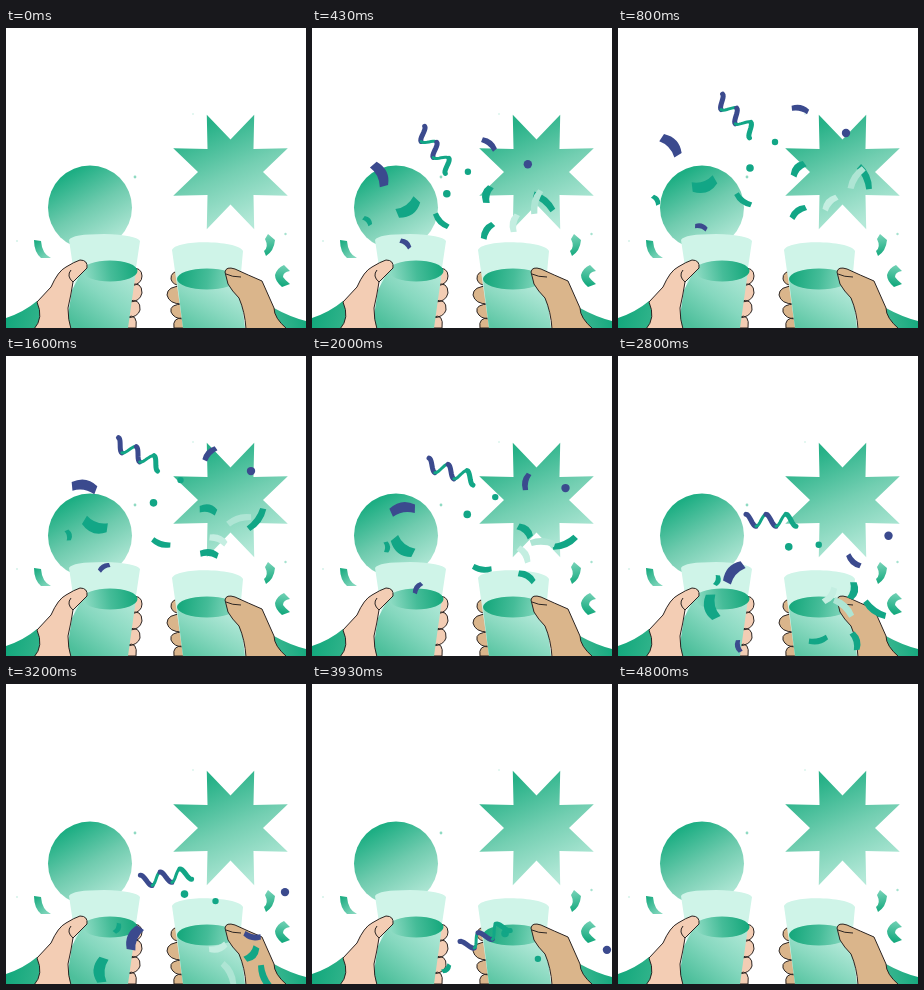
Animation of 300x300 px, one loop 6430 ms. Source, as an HTML page with a canvas:

```html
<!DOCTYPE html>
<html lang="en">
<head>
<meta charset="utf-8">
<title>Cheers</title>
<style>
html, body { margin: 0; width: 100%; height: 100%; overflow: hidden; background: #fff; }
canvas { display: block; width: 100vw; height: 100vh; }
</style>
</head>
<body>
<canvas id="stage" width="300" height="300"></canvas>
<script>
const LOOP = 6430, START = 200, SETTLE = 800, END = 4800;
const ORIGIN = [150, 305];
const TEAL = '#12a87c', MINT = '#cff4e8', GREEN = '#12a686', NAVY = '#3b4a8e', INK = '#2b2422';
const canvas = document.getElementById('stage');
const scene = document.createElement('canvas');
scene.width = scene.height = 300;
let g = scene.getContext('2d');

function blend(x0, y0, x1, y1, ...colors) {
  const grad = g.createLinearGradient(x0, y0, x1, y1);
  colors.forEach((c, i) => grad.addColorStop(i / (colors.length - 1), c));
  return grad;
}

function shape(d, fill, line) {
  const path = new Path2D(d);
  if (fill) { g.fillStyle = fill; g.fill(path); }
  if (line) { g.strokeStyle = line; g.lineWidth = 1; g.lineJoin = 'round'; g.stroke(path); }
}

function oval(x, y, rx, ry, fill) {
  g.beginPath();
  g.ellipse(x, y, rx, ry, 0, 0, Math.PI * 2);
  g.fillStyle = fill;
  g.fill();
}

function star(x, y, outer, inner, fill) {
  g.beginPath();
  for (let i = 0; i < 16; i++) {
    const a = i * Math.PI / 8, r = i % 2 ? outer : inner;
    g.lineTo(x + r * Math.cos(a), y + r * Math.sin(a));
  }
  g.fillStyle = fill;
  g.fill();
}

function drawScene() {
  oval(84, 179.5, 42, 42, blend(64, 145, 104, 214, '#1dae83', '#6fcbae', '#aee6d4'));
  star(224.5, 144, 62, 32.5, blend(198, 98, 242, 196, '#26b187', '#74cfb2', '#b4e9d8'));

  // loose pieces lying still
  shape('M28 212 L35 213 Q36 226 45 230 L35 230 Q28 224 28 212Z', blend(28, 212, 44, 231, TEAL, '#8fdcc4'));
  shape('M262 206 L269 212 Q268 223 260 228 L258 223 Q263 219 259 211Z', blend(260, 206, 264, 228, '#7bd5ba', TEAL));
  shape('M278 237 L284 243 Q277 244 277 249 Q279 252 284 256 L276 259 Q269 253 269 247 Q271 240 278 237Z', blend(280, 238, 276, 258, '#6fd0b3', TEAL));
  oval(129, 149, 1.4, 1.4, '#8fdac2');
  oval(279.5, 206, 1.2, 1.2, '#a5e2cf');
  oval(11, 213, .8, .8, '#b5e8d8');
  oval(187, 86, .7, .7, '#b5e8d8');

  // left glass
  const skinL = '#f3cdb4';
  shape('M124 240 Q136 239 136 248 Q136 256 125 258Z M124 257 Q136 253 136 265 Q134 274 123 274Z M122 273 Q135 270 134 282 Q132 289 121 290Z M121 289 Q132 285 130 300 L120 300Z', skinL, INK);
  shape('M63 212 Q66 206 98 206 Q130 207 134 213 L121 300 L62 300 L69 252Z', MINT);
  shape('M76 243 Q104 262 130 243 L122 300 L60 300 L66 262Z', blend(76, 300, 122, 240, '#4dbf9b', '#86d8bf', '#b2e9d8'));
  oval(104, 243, 27.5, 10.5, blend(78, 248, 131, 238, '#8fdcc4', '#45bc98', '#14a77b'));

  // left hand
  shape('M0 290 Q18 284 31 273 L40 300 L0 300Z', blend(0, 290, 38, 300, '#12a87c', '#36b58d'));
  shape('M31 274 L45 259 Q52 243 60 239 Q68 234 74 232 Q82 232 81 240 Q74 247 67 254 Q65 267 62 280 Q62 292 65 301 L28 301 Q38 290 31 274Z', skinL, INK);
  shape('M67 254 Q60 248 65 242', null, INK);

  // right glass
  const skinR = '#dab58b';
  shape('M177 242 Q164 243 165 251 Q166 257 176 258Z M177 258 Q161 258 161 267 Q163 276 176 276Z M178 276 Q163 276 165 284 Q168 291 178 291Z M178 290 Q166 289 168 300 L180 300Z', skinR, INK);
  shape('M166 222 C170 211 232 212 237 223 L230 300 L177 300Z', MINT);
  shape('M171 252 Q200 270 233 250 L239 300 L177 300Z', blend(186, 301, 214, 252, '#5cc6a4', '#8ad9c0', '#b4e9d9'));
  oval(201, 251, 30, 10.5, blend(172, 246, 231, 256, '#14a77b', '#45bc98', '#8fdcc4'));

  // right hand
  shape('M300 293 Q284 289 266 279 L262 300 L300 300Z', blend(300, 290, 262, 300, '#16a97e', '#43ba95'));
  shape('M219 244 Q220 238 229 241 Q242 247 256 253 L268 280 Q268 290 281 301 L240 301 Q239 284 233 270 Q226 263 222 256 L219 244Z', skinR, INK);
  shape('M220 246 Q226 249 235 249', null, INK);
}

// x, y at the top; drift and fall rate; length, thickness (negative bends the other way); angle and spin in degrees
const pieces = [
  [NAVY, 53, 117, 25, 1.33, 26, 12, 50, -38],
  [NAVY, 182, 81, 21.5, 1.66, 18, 7, 15, -60],
  [GREEN, 86, 157, 3, 1.25, 26, -13, -22, 38],
  [GREEN, 180, 141, 22, 1.25, 18, 9, -45, 60],
  [GREEN, 180, 184, 23, 1.35, 19, 8, -35, 45],
  [GREEN, 125, 172, 30, 1.5, 20, -7, 35, -20],
  [NAVY, 83, 199, 15, 1.22, 13, 6, 20, -48],
  [GREEN, 247, 149, 4, 1.4, 27, 8, 68, 60],
  [GREEN, 38, 172, 24.5, .7, 11, 6, 60, 20],
  ['#c4eee1', 212, 175, 0, .86, 19, 8, -45, 70],
  ['#aee5d4', 238, 150, -5, 1.35, 26, 8, -55, 40]
];
const dots = [
  [NAVY, 228, 105, 17, 1, 4.2],
  [GREEN, 157, 114, 17.5, 1, 3.2],
  [GREEN, 132, 140, 15.5, .68, 3.8]
];
const ribbon = [118, 88, 14, 1.02];

const fall = s => 70 * s - 124 * (1 - Math.exp(-.66 * s));

// pieces shoot up from below the glasses, slow down at the top, then drift and fall
function place(x, y, drift, rate, t) {
  const s = Math.max(0, t - SETTLE) / 800;
  const u = Math.min(1, (t - START + 50) / (SETTLE - START + 50));
  const burst = 1 - (1 - u) ** 3;
  const [ox, oy] = ORIGIN;
  return [ox + (x - ox) * burst + drift * s, oy + (y - oy) * burst + rate * fall(s)];
}

function at([x, y], degrees, draw) {
  g.save();
  g.translate(x, y);
  g.rotate(degrees * Math.PI / 180);
  draw();
  g.restore();
}

function band(color, w, h) {
  const a = w / 2, b = h / 2;
  g.beginPath();
  g.moveTo(-a, -b * .3);
  g.quadraticCurveTo(0, -b * 1.9, a, -b * .5);
  g.lineTo(a * .9, b * .9);
  g.quadraticCurveTo(0, b * .1, -a * .8, b * 1.1);
  g.closePath();
  g.fillStyle = color;
  g.fill();
}

// a twisted strip: falling strands show the broad navy face, rising ones the narrow green back
function twist() {
  const length = 50, half = 10;
  g.lineCap = 'round';
  for (let i = 0; i < length / half; i++) {
    const front = i % 2 === 0;
    g.beginPath();
    for (let k = 0; k <= half; k++)
      g.lineTo(i * half + k - length / 2, (front ? -6 : 6) * Math.cos(Math.PI * k / half));
    g.strokeStyle = front && i < 4 ? NAVY : GREEN;
    g.lineWidth = front ? 5 : 3;
    g.stroke();
  }
}

function confetti(t) {
  const turn = (t - SETTLE) / 800;
  for (const [color, x, y, drift, rate, w, h, angle, spin] of pieces)
    at(place(x, y, drift, rate, t), angle + spin * turn, () => band(color, w, h));
  for (const [color, x, y, drift, rate, r] of dots)
    oval(...place(x, y, drift, rate, t), r, r, color);
  at(place(...ribbon, t), 45 - 18 * turn, twist);
}

drawScene();
g = canvas.getContext('2d');
const began = performance.now();

function frame() {
  const t = (performance.now() - began) % LOOP;
  // two poses per 100 ms, held for 30 and 70 ms
  const pose = Math.floor(t / 100) * 100 + (t % 100 >= 30 ? 50 : 0);
  g.fillStyle = '#fff';
  g.fillRect(0, 0, 300, 300);
  g.drawImage(scene, 0, 0);
  if (t >= START && t < END) confetti(pose);
  requestAnimationFrame(frame);
}
frame();
</script>
</body>
</html>
```
